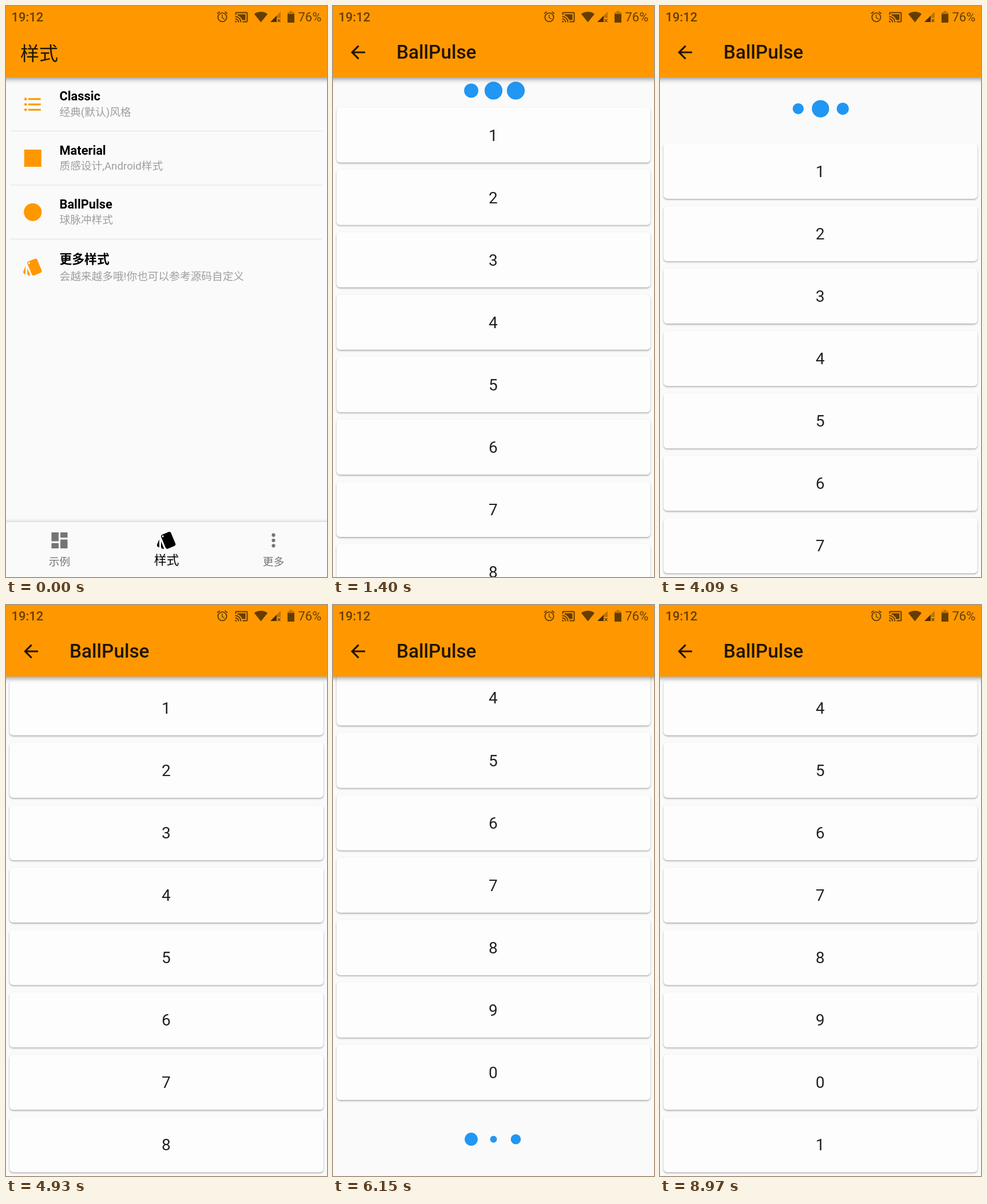
These frames come from a looping animation (561x998 px, 9.03 s). An HTML page with a canvas:

```html
<!DOCTYPE html>
<html lang="zh">
<head>
<meta charset="utf-8">
<title>BallPulse</title>
<style>
  html, body { margin: 0; width: 100%; height: 100%; overflow: hidden; background: #fafafa; }
  canvas { display: block; }
</style>
</head>
<body>
<canvas id="stage" width="561" height="998"></canvas>
<script>
const W = 561, H = 998, LOOP = 9030;
const DP = W / 360;
const BAR = 125, ROW = 70 * DP, MAX_SCROLL = 10 * ROW - (H - BAR);
const ORANGE = '#ff9800', PAPER = '#fafafa', BLUE = '#2196f3';
const FONTS = "Roboto, 'Noto Sans CJK SC', 'Noto Sans CJK', sans-serif";
const ctx = document.getElementById('stage').getContext('2d');

// Icons on a 24-unit grid
const ICONS = {
  style: new Path2D('M2.53 19.65l1.34.56v-9.03l-2.43 5.86c-.41 1.02.08 2.19 1.09 2.61zm19.5-3.7L17.07 3.98c-.31-.75-1.04-1.21-1.81-1.23-.26 0-.53.04-.79.15L7.1 5.95c-.75.31-1.21 1.03-1.23 1.8-.01.27.04.54.15.8l4.96 11.97c.31.76 1.05 1.22 1.83 1.23.26 0 .52-.05.77-.15l7.36-3.05c1.02-.42 1.51-1.59 1.09-2.6zM7.88 8.75c-.55 0-1-.45-1-1s.45-1 1-1 1 .45 1 1-.45 1-1 1zm-2 11c0 1.1.9 2 2 2h1.45l-3.45-8.34v6.34z'),
  dashboard: new Path2D('M3 13h8V3H3zM3 21h8v-6H3zM13 21h8V11h-8zM13 3v6h8V3z'),
  back: new Path2D('M20 11H7.83l5.59-5.59L12 4l-8 8 8 8 1.41-1.41L7.83 13H20z'),
  alarm: new Path2D('M22 5.72l-4.6-3.86-1.29 1.53 4.6 3.86zM7.88 3.39L6.6 1.86 2 5.71l1.29 1.53zM12.5 8H11v6l4.75 2.85.75-1.23-4-2.37zM12 4a9 9 0 1 0 0 18a9 9 0 1 0 0-18zM12 20a7 7 0 1 1 0-14a7 7 0 1 1 0 14z'),
  cast: new Path2D('M1 18v3h3c0-1.66-1.34-3-3-3zm0-4v2c2.76 0 5 2.24 5 5h2c0-3.87-3.13-7-7-7zm18-7H5v1.63c3.96 1.28 7.09 4.41 8.37 8.37H19zM1 10v2c4.97 0 9 4.03 9 9h2c0-6.08-4.93-11-11-11zm20-7H3c-1.1 0-2 .9-2 2v3h2V5h18v14h-7v2h7c1.1 0 2-.9 2-2V5c0-1.1-.9-2-2-2z'),
  wifi: new Path2D('M12 21.5L23.64 7c-.45-.34-4.93-4-11.64-4S.81 6.66.36 7z')
};

// Motion tracks: [time, value]
const PULL = [[1262, 0], [1330, 22], [1400, 45.5], [1600, 92], [1850, 122], [2060, 128.7],
  [2120, 129], [2330, ROW], [4300, ROW], [4560, 0]];
const SCROLL = [[4980, 0], [5250, 100], [5490, 219], [5620, 262.5], [5860, 292],
  [6180, 346], [6260, 347], [6500, 3 * ROW]];
const LOADED = 8630;
const OPEN = 560, OPEN_TIME = 310, TAP = 330;

const PULSE = [[6, 13, 20], [13, 6, 13], [20, 13, 6], [13, 20, 13]];

const clamp = (v, a = 0, b = 1) => Math.min(b, Math.max(a, v));

// Monotone cubic interpolation
function track(pts, t) {
  const last = pts.length - 1;
  if (t <= pts[0][0]) return pts[0][1];
  if (t >= pts[last][0]) return pts[last][1];
  const slope = i => (pts[i + 1][1] - pts[i][1]) / (pts[i + 1][0] - pts[i][0]);
  const tangent = i => {
    if (i === 0 || i === last) return 0;
    const a = slope(i - 1), b = slope(i);
    return a * b > 0 ? 2 * a * b / (a + b) : 0;
  };
  let i = 0;
  while (t > pts[i + 1][0]) i++;
  const h = pts[i + 1][0] - pts[i][0], p = (t - pts[i][0]) / h, q = 1 - p;
  return pts[i][1] * q * q * (1 + 2 * p) + pts[i + 1][1] * p * p * (3 - 2 * p)
    + h * p * q * (tangent(i) * q - tangent(i + 1) * p);
}

function text(str, x, y, size, color, weight = 400, align = 'left') {
  ctx.font = `${weight} ${size}px ${FONTS}`;
  ctx.fillStyle = color;
  ctx.textAlign = align;
  ctx.fillText(str, x, y);
}

function icon(name, x, y, color, scale = DP) {
  ctx.save();
  ctx.translate(x - 12 * scale, y - 12 * scale);
  ctx.scale(scale, scale);
  ctx.fillStyle = color;
  ctx.fill(ICONS[name], 'evenodd');
  ctx.restore();
}

function dot(x, y, r, color) {
  ctx.fillStyle = color;
  ctx.beginPath();
  ctx.arc(x, y, r, 0, 7);
  ctx.fill();
}

function rect(x, y, w, h, color) {
  ctx.fillStyle = color;
  ctx.fillRect(x, y, w, h);
}

function poly(color, ...p) {
  ctx.fillStyle = color;
  ctx.beginPath();
  for (let i = 0; i < p.length; i += 2) ctx.lineTo(p[i], p[i + 1]);
  ctx.fill();
}

function shadowed(blur, dy, alpha, draw) {
  ctx.save();
  ctx.shadowColor = `rgba(0,0,0,${alpha})`;
  ctx.shadowBlur = blur;
  ctx.shadowOffsetY = dy;
  draw();
  ctx.restore();
}

function appBar() {
  shadowed(8, 3, 0.4, () => rect(-10, -10, W + 20, BAR + 10, ORANGE));
}

function statusBar() {
  const ink = 'rgba(0,0,0,.6)', faint = 'rgba(0,0,0,.25)';
  text('19:12', 9.5, 27.3, 22, ink, 500);
  icon('alarm', 378, 18.8, ink, 0.95);
  icon('cast', 411.5, 19.5, ink, 1);
  icon('wifi', 445.5, 19, ink, 1);
  poly(faint, 462, 28, 480, 10, 480, 21, 473, 21, 473, 28);
  poly(ink, 462, 28, 473, 17, 473, 28);
  ctx.strokeStyle = ink;
  ctx.lineWidth = 1.4;
  ctx.beginPath();
  ctx.moveTo(474.5, 23); ctx.lineTo(479.5, 28);
  ctx.moveTo(479.5, 23); ctx.lineTo(474.5, 28);
  ctx.stroke();
  rect(495.5, 8.5, 5, 2.5, faint);
  rect(492, 11, 12, 3, faint);
  rect(492, 14, 12, 15, ink);
  text('76%', 510.5, 27.3, 22, ink);
}

function menuRow(y, title, note, titleDy, noteDy) {
  text(title, 93.5, y + titleDy, 14 * DP, '#000', 700);
  text(note, 93.5, y + noteDy, 12 * DP, '#9e9e9e');
}

function ripple(t) {
  const p = clamp((t - TAP) / 300);
  if (!p) return;
  ctx.save();
  ctx.beginPath();
  ctx.rect(0, 313.5, W, 94);
  ctx.clip();
  rect(0, 313, W, 95, `rgba(0,0,0,${0.06 * clamp(p * 2)})`);
  dot(280, 360, 30 + 260 * p, 'rgba(0,0,0,.06)');
  ctx.restore();
}

function menuPage(t) {
  rect(0, 0, W, H, PAPER);
  ripple(t);
  const x = 30 * DP;
  for (const y of [218.5, 313, 407.3]) rect(8, y - 0.5, W - 16, 1, '#e0e0e0');

  for (const dy of [-6, 0, 6]) {
    dot(28 + 4 * DP, 172 + dy * DP, 1.5 * DP, ORANGE);
    rect(28 + 7 * DP, 172 + (dy - 1) * DP, 14 * DP, 2 * DP, ORANGE);
  }
  rect(x - 15, 251, 30, 30, ORANGE);
  dot(x, 360.3, 10 * DP, ORANGE);
  icon('style', x, 456, ORANGE);

  menuRow(125, 'Classic', '经典(默认)风格', 40.3, 66.5);
  menuRow(219, 'Material', '质感设计,Android样式', 40.7, 67);
  menuRow(313, 'BallPulse', '球脉冲样式', 41, 67.3);
  menuRow(408, '更多样式', '会越来越多哦!你也可以参考源码自定义', 42, 71);

  shadowed(6, -1, 0.2, () => rect(-10, 902, W + 20, H, PAPER));
  icon('dashboard', 93.5, 934, '#757575');
  icon('style', 280.5, 933.5, '#000');
  for (const dy of [-6, 0, 6]) dot(467.5, 934 + dy * DP, 2 * DP, '#757575');
  text('示例', 93.5, 978, 12 * DP, '#757575', 400, 'center');
  text('样式', 280.5, 976.3, 14 * DP, '#000', 400, 'center');
  text('更多', 467.5, 978, 12 * DP, '#757575', 400, 'center');

  appBar();
  text('样式', 25, 95, 33, 'rgba(0,0,0,.87)');
}

function ballSizes(step) {
  if (step <= 0) return [20, 20, 20];
  if (step === 1) return [13, 20, 20];
  return PULSE[(step - 2) % 4];
}

function balls(y, phase) {
  const step = Math.floor(Math.max(0, phase)), f = Math.max(0, phase) - step;
  const from = ballSizes(step), to = ballSizes(step + 1);
  from.forEach((size, i) => {
    dot(W / 2 + (i - 1) * 25 * DP, y, (size + (to[i] - size) * f) * DP / 2, BLUE);
  });
}

function card(y, label) {
  shadowed(3, 1.6, 0.32, () => {
    ctx.fillStyle = '#fdfdfd';
    ctx.beginPath();
    ctx.roundRect(4 * DP, y + 4 * DP, W - 8 * DP, ROW - 8 * DP, 4 * DP);
    ctx.fill();
  });
  text(label, W / 2 - 0.7, y + ROW / 2 + 10.2, 18 * DP, 'rgba(0,0,0,.87)', 400, 'center');
}

function listPage(t) {
  rect(0, 0, W, H, PAPER);
  const pull = track(PULL, t), scroll = track(SCROLL, t);
  const top = BAR + pull - scroll, count = t < LOADED ? 10 : 20;
  if (pull > 0) balls(BAR + pull / 2, (t - 1277) / 215);
  for (let i = 0; i < count; i++) {
    const y = top + i * ROW;
    if (y > BAR - ROW - 10 && y < H) card(y, String((i + 1) % 10));
  }
  // The footer's height trails the drag slightly
  const foot = track(SCROLL, t - 20) - MAX_SCROLL;
  if (foot > 0 && t < LOADED) balls(top + 10 * ROW + foot / 2, (t - 5494) / 203);
  appBar();
  icon('back', 28 * DP, 81, 'rgba(0,0,0,.87)');
  text('BallPulse', 111, 91.7, 33.3, 'rgba(0,0,0,.87)', 500);
}

function draw(t) {
  const open = clamp((t - OPEN) / OPEN_TIME);
  if (open < 1) menuPage(t);
  if (open > 0) {
    ctx.save();
    ctx.globalAlpha = open * (2 - open) * open;
    ctx.translate(0, H / 4 * (1 - open) ** 3);
    listPage(t);
    ctx.restore();
  }
  statusBar();
}

const start = performance.now();
function tick() {
  draw((performance.now() - start) % LOOP);
  requestAnimationFrame(tick);
}
tick();
</script>
</body>
</html>
```
